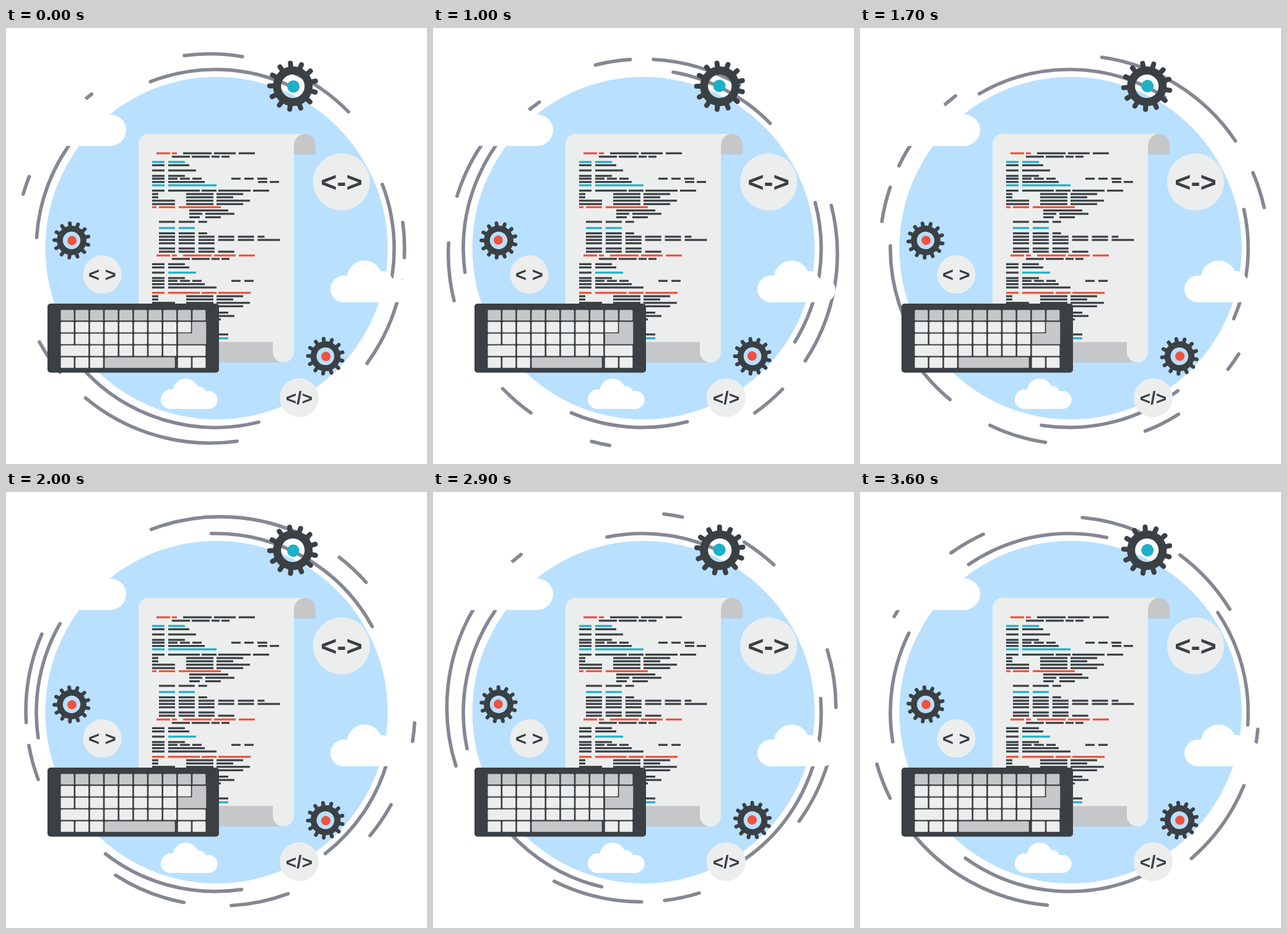
Write an HTML page that moves like this. It is 680 px wide and 704 px high and loops after 3700 ms.

```html
<!DOCTYPE html>
<html lang="en">
<head>
<meta charset="utf-8">
<title>Code scroll</title>
<style>
  html, body { margin: 0; width: 100%; height: 100%; overflow: hidden; background: #fff; }
  svg { display: block; width: 680px; height: 704px; }
  text { font-family: "Liberation Sans", Arial, sans-serif; font-weight: bold; text-anchor: middle; fill: #3a4044; white-space: pre; }
</style>
</head>
<body>
<svg viewBox="0 0 680 704">
  <defs>
    <g id="cloud" fill="#fff">
      <circle cx="28" cy="59" r="28"/>
      <circle cx="71" cy="37" r="37"/>
      <circle cx="108" cy="43" r="21"/>
      <circle cx="136.5" cy="61" r="25.5"/>
      <path d="M28 45H136V86.5H28z"/>
    </g>
    <g id="gear" fill="none" stroke="#3a4044">
      <circle r="25.5" stroke-width="13"/>
    </g>
  </defs>
  <g id="rings" fill="none" stroke="#858793" stroke-width="5.6" stroke-linecap="round">
    <path id="outer"/>
    <path id="inner"/>
  </g>
  <circle cx="340" cy="355.5" r="276.5" fill="#b9e0ff"/>

  <path fill="#c5c7c8" d="M465 204V190a18 19 0 0 1 18-19a17 18 0 0 1 17 18V204zM300 507H448V540H300z"/>
  <path fill="#eceeee" d="M214 507V187a16 16 0 0 1 16-16H483a18 19 0 0 0-18 19V523a17 17 0 0 1-34 0V507z"/>
  <g id="code"></g>

  <rect x="67" y="445" width="277" height="111.5" rx="5" fill="#3a4044"/>
  <g id="keys"></g>

  <use href="#cloud" x="32" y="104"/>
  <use href="#cloud" transform="translate(524 375.5) scale(.778)"/>
  <use href="#cloud" transform="translate(250 566) scale(.566)"/>

  <g fill="#eceeee">
    <circle cx="542" cy="248.500" r="46"/>
    <circle cx="155.500" cy="398" r="31"/>
    <circle cx="473.500" cy="597" r="31.500"/>
  </g>
  <text x="542" y="264" font-size="45">&lt;-&gt;</text>
  <text x="155.500" y="408.500" font-size="31">&lt; &gt;</text>
  <text x="473.500" y="607.500" font-size="30">&lt;/&gt;</text>
  <g id="gears"></g>
</svg>
<script>
const $ = id => document.getElementById(id);
const add = (parent, tag, attrs) => {
  const el = document.createElementNS('http://www.w3.org/2000/svg', tag);
  for (const k in attrs) el.setAttribute(k, attrs[k]);
  return parent.appendChild(el);
};
const ink = { k: '#3a4044', r: '#f0523c', c: '#1cb0c9' };

// Arcs, as start and end angles in degrees, shortened for the round caps.
function arcs(cx, cy, r, spans) {
  const cap = 160 / r;
  const at = deg => {
    const a = deg * Math.PI / 180;
    return (cx + r * Math.cos(a)).toFixed(2) + ' ' + (cy + r * Math.sin(a)).toFixed(2);
  };
  return spans.map(([a, b]) => `M${at(a + cap)}A${r} ${r} 0 0 1 ${at(b - cap)}`).join('');
}
const cx = 338, cy = 356;
// The outer ring is off centre, so it wobbles as it turns.
$('outer').setAttribute('d', arcs(cx - 8.5, cy, 314.2, [
  [-164.3, -157.8], [-139, -127], [-98.1, -79.9], [-66.9, -44.1],
  [-8.2, 3.2], [9, 36.7], [81.5, 130.3], [140, 151.8]]));
$('inner').setAttribute('d', arcs(cx, cy, 289, [
  [-177, -140.2], [-111.8, -64.4], [-21.5, 17.5], [75.4, 139]]));

// Lines of code
const bar = (color, x, y, w) =>
  add($('code'), 'rect', { x, y: y - 1.6, width: w, height: 3.2, fill: color });

// Each row: y, colours in the two copies of the block, then x and width pairs.
const block = [
  [0, 'rr', 243, 22, 268, 8], [0, 'kr', 286, 46, 336, 35, 376, 26],
  [5.5, 'kk', 268, 29, 300, 29, 332, 13, 348, 13],
  [14, 'ck', 236, 20, 262, 27],
  [19.3, 'kk', 236, 20, 262, 34],
  [27.7, 'kk', 236, 20], [27.7, 'kc', 262, 45],
  [36.5, 'kk', 236, 20, 262, 27],
  [41, 'kk', 236, 20, 262, 15, 281, 16, 301, 15, 364, 15, 385, 15], [41, 'k', 406, 16],
  [46.3, 'kk', 236, 20, 262, 59], [46.3, 'k', 407, 15, 426, 15],
  [51.7, 'ck', 236, 20, 262, 78],
  [60.3, 'kr', 236, 20, 262, 51, 316, 24, 343, 52], [60.3, 'k', 399, 26],
  [65.8, 'kk', 236, 10, 291, 44, 340, 43],
  [71, 'kk', 236, 10, 291, 44, 340, 27],
  [76.5, 'kk', 236, 37, 291, 44, 340, 54],
  [82, 'kk', 236, 37, 291, 44, 340, 43],
  [87, 'r', 236, 7, 247, 26, 279, 68],
  [92.3, 'kk', 296, 63],
  [97.7, 'kk', 296, 21, 322, 47],
  [103.3, 'kk', 296, 17, 322, 25]
];
[202.3, 367.3].forEach((top, copy) => {
  for (const [y, colors, ...cells] of block) {
    const color = ink[colors[copy]];
    if (!color) continue;
    for (let i = 0; i < cells.length; i += 2) bar(color, cells[i], top + y, cells[i + 1]);
  }
});
// Rows of evenly spaced words: y, count, width of the last, colour.
for (const [y, n, last, color] of [
  [313, 3, 14, 'k'], [323, 2, 26, 'c'], [331.5, 3, 14, 'k'], [337, 6, 11, 'k'],
  [342.2, 6, 36, 'k'], [347.6, 3, 26, 'k'], [356, 3, 26, 'k'], [361.2, 4, 26, 'k']])
  for (let i = 0; i < n; i++) bar(ink[color], 247 + 31.9 * i, y, i < n - 1 ? 26 : last);
bar(ink.k, 330, 494.8, 29);
bar(ink.c, 330, 501, 29);

// Keyboard
const light = '#eceeee', grey = '#c5c7c8', pitch = 23.65;
function key(col, row, span = 1, fill = light) {
  add($('keys'), 'rect', {
    x: 88.5 + col * pitch, y: 455.3 + row * 19.1,
    width: span * pitch - 2.6, height: 17, rx: 1.5, fill
  });
}
for (let i = 0; i < 10; i++) key(i, 0, 1, grey);
add($('keys'), 'path', { d: 'M300.500 474.500H323.300V510.500H278V493H300.500z', fill: grey });
for (let i = 0; i < 9; i++) key(i, 1);
for (let i = 0; i < 8; i++) key(i, 2);
for (const i of [0, 8]) key(i, 3, 2);
for (let i = 2; i < 8; i++) key(i, 3);
for (const i of [0, 1, 2, 8, 9]) key(i, 4);
key(3, 4, 4.9, grey);

// Gears
const teeth = 13;
for (let i = 0; i < teeth; i++)
  add($('gear'), 'path', {
    d: 'M28 0H37.500', 'stroke-width': 8, 'stroke-linecap': 'round',
    transform: `rotate(${-96 + i * 360 / teeth})`
  });
const wheels = [[463.3, 94, 1, ink.c], [106, 343, .745, ink.r], [516, 530, .755, ink.r]]
  .map(([x, y, size, color]) => {
    const spot = add($('gears'), 'g', { transform: `translate(${x} ${y}) scale(${size})` });
    const wheel = add(spot, 'g', {});
    add(wheel, 'use', { href: '#gear' });
    add(wheel, 'circle', { cx: .9, cy: .4, r: 10, fill: color });
    return wheel;
  });

function draw(now) {
  const turn = Math.floor(now % 3700 / 100) * 9.64;
  $('outer').setAttribute('transform', `rotate(${-turn} ${cx} ${cy})`);
  $('inner').setAttribute('transform', `rotate(${turn} ${cx} ${cy})`);
  for (const wheel of wheels) wheel.setAttribute('transform', `rotate(${turn * 2})`);
}
const start = performance.now();
function tick() {
  draw(performance.now() - start);
  requestAnimationFrame(tick);
}
tick();
</script>
</body>
</html>
```
